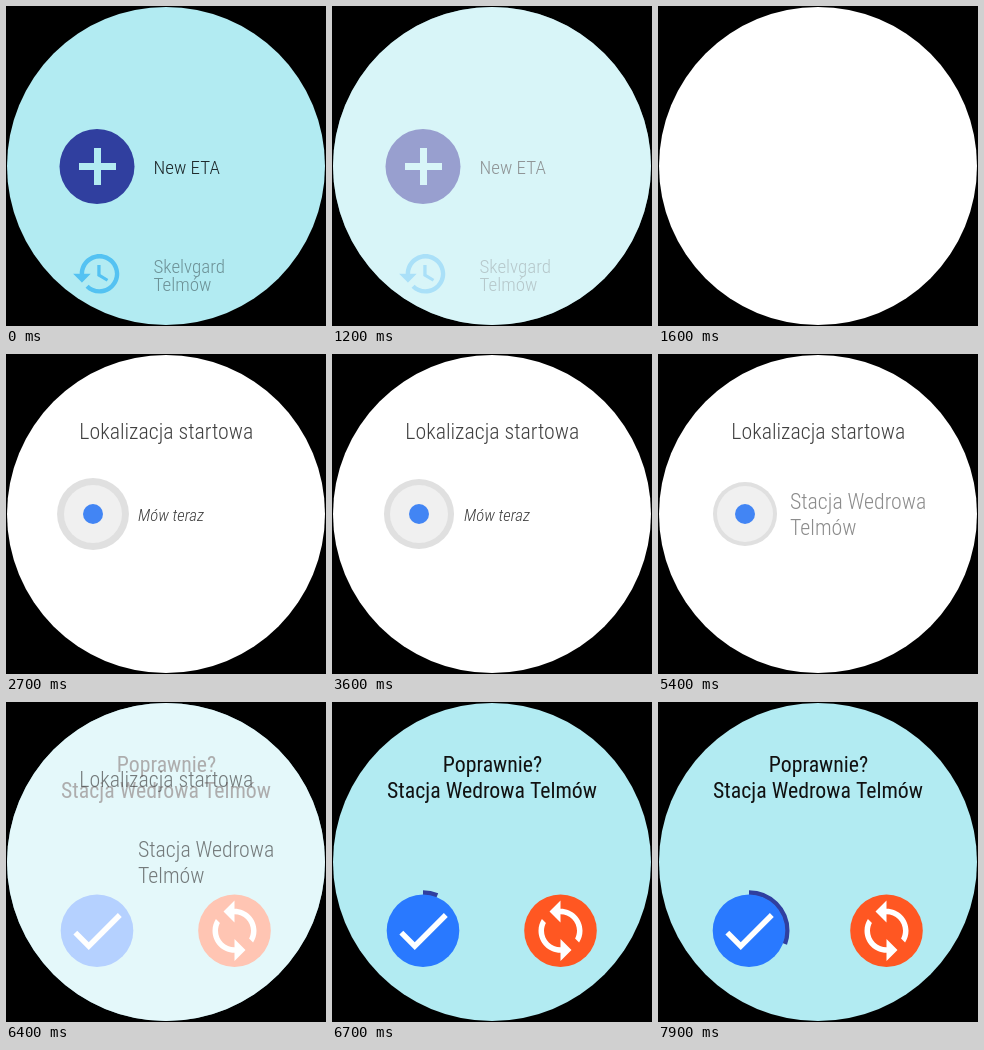
An HTML page with a canvas for the animation above (8 s loop, 320 by 320 pixels).

```html
<!DOCTYPE html>
<html lang="pl">
<head>
<meta charset="utf-8">
<title>Watch ETA</title>
<style>
  html, body { margin: 0; width: 100%; height: 100%; overflow: hidden; background: #000; }
  canvas { display: block; width: 100vw; height: 100vh; }
</style>
</head>
<body>
<canvas id="stage" width="320" height="320"></canvas>
<script>
const ctx = document.getElementById('stage').getContext('2d');
const LOOP = 8000, STEP = 100, TAU = Math.PI * 2;
const CYAN = '#b2ebf2', INDIGO = '#303f9f';
const LIGHT = '350', HEADING = 21.8;

const ICONS = {
  history: new Path2D('M13 3c-4.97 0-9 4.03-9 9H1l3.89 3.89.07.14L9 12H6c0-3.87 3.13-7 7-7s7 3.13 7 7-3.13 7-7 7c-1.93 0-3.68-.79-4.94-2.06l-1.42 1.42C8.27 19.99 10.51 21 13 21c4.97 0 9-4.03 9-9s-4.03-9-9-9zm-1 5v5l4.28 2.54.72-1.21-3.5-2.08V8H12z'),
  sync: new Path2D('M12 4V1L8 5l4 4V6c3.31 0 6 2.69 6 6 0 1.01-.25 1.97-.7 2.8l1.46 1.46C19.54 15.03 20 13.57 20 12c0-4.42-3.58-8-8-8zm0 14c-3.31 0-6-2.69-6-6 0-1.01.25-1.97.7-2.8L5.24 7.74C4.46 8.97 4 10.43 4 12c0 4.42 3.58 8 8 8v3l4-4-4-4v3z'),
  check: new Path2D('M9 16.17L4.83 12l-1.42 1.41L9 19 21 7l-1.41-1.41z')
};

const clamp = v => Math.min(1, Math.max(0, v));
const ramp = (t, from, to) => clamp((t - from) / (to - from));

const fontOf = (style, size) => `${style} condensed ${size}px "Roboto Condensed", Roboto, sans-serif`;

// Without a condensed face, a smaller size keeps the text within the layout.
function sizeFactor() {
  const sample = 'Lokalizacja startowa';
  ctx.font = fontOf('300', 100);
  const narrow = ctx.measureText(sample).width;
  ctx.font = '300 100px Roboto, sans-serif';
  return narrow < ctx.measureText(sample).width * 0.96 ? 1 : 0.868;
}
const factor = sizeFactor();

function text(str, x, y, size, color, style = LIGHT, align = 'left') {
  ctx.font = fontOf(style, size * factor);
  ctx.textAlign = align;
  ctx.fillStyle = color;
  ctx.fillText(str, x, y);
}

function disc(x, y, r, color) {
  ctx.fillStyle = color;
  ctx.beginPath();
  ctx.arc(x, y, r, 0, TAU);
  ctx.fill();
}

function icon(name, x, y, scale, color) {
  ctx.save();
  ctx.translate(x, y);
  ctx.scale(scale, scale);
  ctx.translate(-12, -12);
  ctx.fillStyle = color;
  ctx.fill(ICONS[name]);
  ctx.restore();
}

function withAlpha(alpha, draw) {
  if (alpha <= 0) return;
  ctx.save();
  ctx.globalAlpha *= alpha;
  draw();
  ctx.restore();
}

const face = color => disc(160, 160, 159, color);
const whiteVeil = alpha => withAlpha(alpha, () => face('#fff'));

function drawList() {
  face(CYAN);
  disc(91, 160.5, 37.5, INDIGO);
  ctx.fillStyle = CYAN;
  ctx.fillRect(73, 157, 37, 7);
  ctx.fillRect(88, 142, 7, 37);
  text('New ETA', 147.5, 168, 19, '#1c2629');
  icon('history', 91.3, 267.8, 2.2, '#54c2f2');
  text('Skelvgard', 147.5, 266.5, 19, '#6d9196');
  text('Telmów', 147.5, 285, 19, '#6d9196');
}

function micRadius(t) {
  if (t < 2400 || t > 5200) return 32;
  if (t < 4300) return 32 + 5.6 * Math.sin(Math.PI * (t - 2400) / 950) ** 2;
  return 32 + 10 * Math.sin(Math.PI * (t - 4300) / 900) ** 4;
}

function drawMic(t) {
  const r = micRadius(t);
  disc(87, 160, r, '#e0e0e0');
  disc(87, 160, 28 + Math.min(1, (r - 32) / 3), '#f0f0f0');
  disc(87, 160, 10, '#4285f4');
}

function drawSpeechText(t) {
  withAlpha(ramp(t, 1700, 2100), () =>
    text('Lokalizacja startowa', 160.3, 85, HEADING, '#404040', LIGHT, 'center'));
  if (t < 5200) {
    withAlpha(ramp(t, 2000, 2400), () =>
      text('Mów teraz', 132, 166.5, 16.8, '#3c3c3c', 'italic ' + LIGHT));
  }
  if (t >= 5400) {
    const color = t < 5600 ? '#8c8c8c' : '#404040';
    text('Stacja Wedrowa', 132, 155, HEADING, color);
    text('Telmów', 132, 181, HEADING, color);
  }
}

function drawConfirm(t) {
  face(CYAN);
  text('Poprawnie?', 160.5, 70, HEADING, '#111', '400', 'center');
  text('Stacja Wedrowa Telmów', 160, 96, HEADING, '#111', '400', 'center');

  const start = -Math.PI / 2;
  ctx.strokeStyle = INDIGO;
  ctx.lineWidth = 5;
  ctx.beginPath();
  ctx.arc(91, 228.7, 38, start, start + TAU * ramp(t, 6400, 11300));
  ctx.stroke();

  disc(91, 228.7, 36.3, '#2979ff');
  icon('check', 91, 228.7, 2.75, '#fff');
  disc(228.5, 228.7, 36.3, '#ff5722');
  icon('sync', 228.5, 228.7, 2.75, '#fff');
}

function render(t) {
  ctx.fillStyle = '#000';
  ctx.fillRect(0, 0, 320, 320);

  if (t < 1600) {
    drawList();
    whiteVeil(t < 1200 ? 0 : t < 1300 ? 0.5 : 0.96);
    return;
  }

  if (t < 6400) {
    face('#fff');
    withAlpha(ramp(t, 1700, 2200) * (1 - ramp(t, 5700, 6100)), () => drawMic(t));
  } else {
    drawConfirm(t);
    whiteVeil(1 - ramp(t, 6300, 6590));
  }
  withAlpha(1 - ramp(t, 6300, 6620), () => drawSpeechText(t));
}

function frame(now) {
  render(Math.floor((now % LOOP) / STEP) * STEP);
  requestAnimationFrame(frame);
}
requestAnimationFrame(frame);
</script>
</body>
</html>
```
